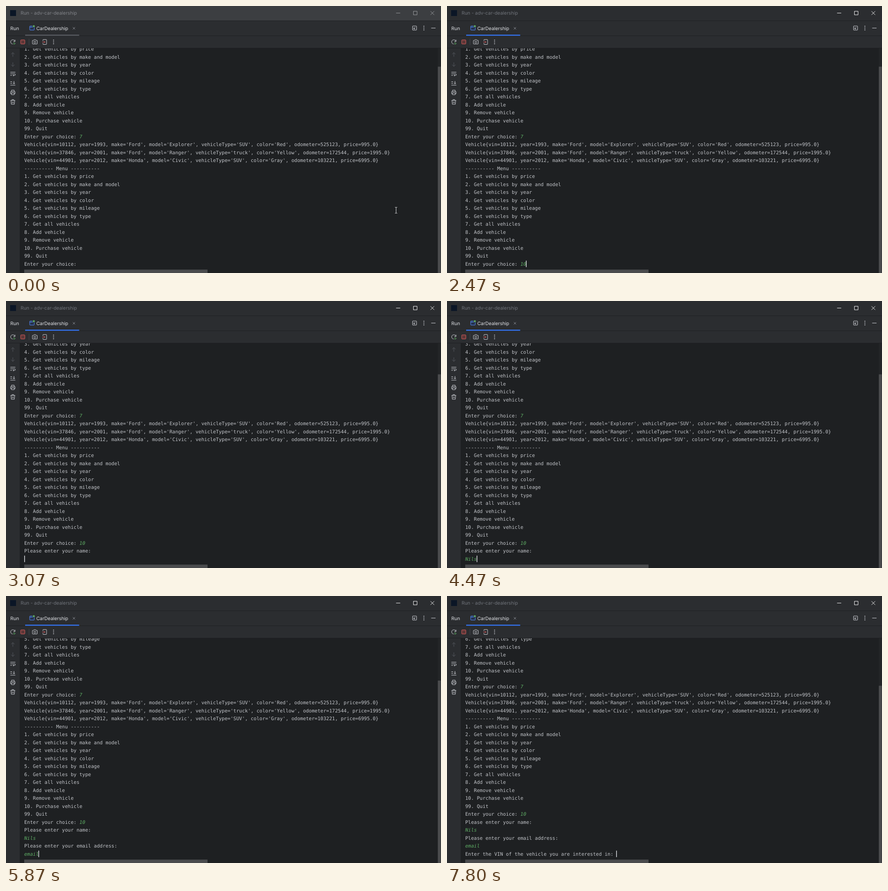
Recreate the animation shown at these times as an HTML page. Size 954 by 587 pixels, loop 8 s.

```html
<!DOCTYPE html>
<html lang="en">
<head>
<meta charset="utf-8">
<title>Run console</title>
<style>
  html, body { margin: 0; width: 100%; height: 100%; overflow: hidden; background: #1e2022; }
  svg { display: block; }
  text { white-space: pre; text-rendering: geometricPrecision; }
  .ui { font: 10.4px Inter, "Open Sans", sans-serif; }
  .mono { font: 10.585px "DejaVu Sans Mono", "Noto Sans Mono", monospace; fill: #c2c4c9; }
  .typed { font-style: italic; fill: #5fad65; }
  .icon { fill: none; stroke: #ced0d6; stroke-width: 1; }
  .dim { stroke: #55585e; }
  .dots { fill: #ced0d6; }
</style>
</head>
<body>
<svg width="954" height="587" viewBox="0 0 954 587">
  <defs>
    <clipPath id="pane"><rect x="31" y="93" width="916" height="487"/></clipPath>
  </defs>
  <rect width="954" height="587" fill="#1e2022"/>

  <!-- title bar -->
  <rect id="bar" width="954" height="32"/>
  <rect x="9" y="9" width="13" height="13" fill="#0b1626"/>
  <text id="title" class="ui" x="32" y="19.3">Run - adv-car-dealership</text>
  <path id="win" fill="none" d="M855.5 15.5h9M893.5 11.5h8v8h-8zM931 11.5l8 8M939 11.5l-8 8"/>

  <!-- tab row and toolbar -->
  <rect y="33" width="954" height="32" fill="#2b2d30"/>
  <rect y="66" width="954" height="27" fill="#2b2d30"/>
  <rect y="92" width="954" height="1" fill="#1e1f22"/>
  <rect y="93" width="30" height="494" fill="#2b2d30"/>
  <text class="ui" x="9.6" y="53" fill="#dfe1e5" font-weight="600">Run</text>
  <text class="ui" x="66.5" y="53" fill="#dfe1e5">CarDealership</text>
  <rect id="tab" x="42" y="63" width="118.5" height="2.4"/>
  <rect x="52" y="44" width="10" height="9" rx="1" fill="#25324d" stroke="#548af7"/>
  <path d="M52 46.5h10" stroke="#548af7"/>
  <circle cx="61" cy="44.4" r="2.9" fill="#2b2d30"/>
  <circle cx="61" cy="44.4" r="2.2" fill="#5fad65"/>
  <path class="icon" style="stroke:#868a91" d="M146.5 46.5l5 5M151.5 46.5l-5 5"/>
  <g class="icon">
    <rect x="891.5" y="44" width="9" height="9" rx="1"/>
    <path d="M898 46.5l-3.6 3.6M894.2 47.2v3.2h3.2M932.5 48.5h9.5"/>
    <!-- rerun -->
    <path d="M19.5 78.2a4.6 4.6 0 1 0-4.8 5.3M19.8 74.2v3.8h-3.8"/>
    <path d="M17 80.3l3.8 2.2l-3.8 2.2z" style="stroke:#57965c;fill:#253627"/>
    <rect x="32.3" y="74.5" width="9" height="9" rx="1" style="stroke:#db5c5c;fill:#5e3838"/>
    <path d="M50.5 72v14" style="stroke:#43454a"/>
    <!-- camera -->
    <path d="M58.5 75.5h2l1-1.5h3.4l1 1.5h2q.6 0 .6.6v6.8q0 .6-.6.6h-9.4q-.6 0-.6-.6v-6.8q0-.6.6-.6z"/>
    <circle cx="63.2" cy="79.3" r="2.1"/>
    <!-- exit -->
    <path d="M81 76.8v-2.3q0-.8.8-.8h6.4q.8 0 .8.8v9.2q0 .8-.8.8h-6.4q-.8 0-.8-.8v-2.3"/>
    <path d="M79.5 79.2h6M83.6 77.2l2 2l-2 2" style="stroke:#db5c5c"/>
    <!-- side strip -->
    <path class="dim" d="M15 111.5v-9M11.2 106.2l3.8-3.8l3.8 3.8M15 124v9M11.2 129l3.8 3.8l3.8-3.8"/>
    <path d="M9.5 145.5h11M9.5 149h9q2 0 2 1.8t-2 1.8h-3.2M17 150.8l-1.8 1.8l1.8 1.8M9.5 152.6h3.5"/>
    <path d="M9.5 166.5h4M9.5 170h4M9.5 174h11M17.5 165v6M15.2 169l2.3 2.3l2.3-2.3"/>
    <path d="M12 188.2v-3.2h6v3.2M12 193h-1.8v-4.8h9.6v4.8h-1.8M12 191h6v4h-6z"/>
    <path d="M9.8 207.7h10.4M13 207.5v-1.7h4v1.7M11 208l.6 8h6.8l.6-8M13.8 210.3v3.5M16.2 210.3v3.5"/>
  </g>
  <g id="dots" class="dots"></g>

  <!-- console -->
  <g clip-path="url(#pane)">
    <g id="log" class="mono"></g>
  </g>
  <rect id="caret" width="1.4" height="14.3" fill="#e4e6ea"/>
  <rect x="40" y="579.5" width="402" height="7.5" fill="#4a4b4d"/>
  <rect x="947" y="93" width="7" height="494" fill="#232527"/>
  <rect id="thumb" x="947" width="6.5" fill="#4a4b4d"/>
  <rect id="glow" x="949" y="135" width="3" height="450" fill="#5a5b5d"/>
  <path id="beam" fill="none" stroke="#d6d7d9" d="M-2.5 -6.5h2l.5 .5l.5 -.5h2M0 -6v12M-2.5 6.5h2l.5 -.5l.5 .5h2"/>
</svg>
<script>
const LOOP = 8000, LEFT = 40, COL = 6.37, ROW = 17.51, BASE = 571, LAST = 27;
const $ = id => document.getElementById(id);

function make(tag, parent, attrs) {
  const el = document.createElementNS("http://www.w3.org/2000/svg", tag);
  for (const key in attrs) el.setAttribute(key, attrs[key]);
  return parent.appendChild(el);
}
const put = (el, key, value) => el.setAttribute(key, value);
const show = (el, on) => put(el, "visibility", on ? "visible" : "hidden");

for (const [x, y] of [[916.5, 48.5], [104.3, 79]])
  for (const d of [-4, 0, 4]) make("circle", $("dots"), { cx: x, cy: y + d, r: 1.1 });

const menu = ["1. Get vehicles by price", "2. Get vehicles by make and model",
  "3. Get vehicles by year", "4. Get vehicles by color", "5. Get vehicles by mileage",
  "6. Get vehicles by type", "7. Get all vehicles", "8. Add vehicle", "9. Remove vehicle",
  "10. Purchase vehicle", "99. Quit", "Enter your choice: "];

const car = (vin, year, make, model, type, color, miles, price) =>
  `Vehicle{vin=${vin}, year=${year}, make='${make}', model='${model}', ` +
  `vehicleType='${type}', color='${color}', odometer=${miles}, price=${price}.0}`;

const lines = [...menu,
  car(10112, 1993, "Ford", "Explorer", "SUV", "Red", 525123, 995),
  car(37846, 2001, "Ford", "Ranger", "truck", "Yellow", 172544, 1995),
  car(44901, 2012, "Honda", "Civic", "SUV", "Gray", 103221, 6995),
  "---------- Menu ----------", ...menu,
  "Please enter your name:", "", "Please enter your email address:", "",
  "Enter the VIN of the vehicle you are interested in: "];

const rowY = row => BASE + (row - LAST) * ROW;
const addText = (row, col, text, cls = "") => {
  const el = make("text", $("log"), { x: LEFT + col * COL, y: rowY(row), class: cls });
  el.textContent = text;
  return el;
};

const printed = lines.map((text, row) => addText(row, 0, text));
addText(11, 19, "7", "typed");

// Keyboard input: row, text and the time of each key
const inputs = [
  { row: 27, text: "10", keys: [2470, 2470] },
  { row: 29, text: "Nils", keys: [3930, 4070, 4200, 4470] },
  { row: 31, text: "email", keys: [5400, 5490, 5580, 5670, 5870] },
  { row: 32, text: "3", keys: [7270], erase: 7800 }
];
for (const item of inputs) item.el = addText(item.row, lines[item.row].length, "", "typed");

// Times at which the console grows by one line
const feeds = [2870, 3070, 5000, 5000, 6270];
const countUntil = (times, t) => times.filter(at => at <= t).length;
const within = (t, a, b) => t >= a && t < b;

function draw(t) {
  const active = t >= 470;
  put($("bar"), "fill", active ? "#2b2d30" : "#3c3e41");
  put($("title"), "fill", active ? "#6f737a" : "#808388");
  put($("win"), "stroke", active ? "#f2f2f2" : "#97999c");
  put($("tab"), "fill", t >= 530 ? "#3574f0" : "#5a5d63");

  const fed = countUntil(feeds, t);
  put($("log"), "transform", `translate(0 ${-fed * ROW})`);
  const top = 93 + 494 * (1 - 490 / (533.6 + 17.5 * fed));
  put($("thumb"), "y", top);
  put($("thumb"), "height", 587 - top);
  show($("glow"), within(t, 1200, 1270));

  show(printed[28], t >= 3070);
  show(printed[30], t >= 5000);
  show(printed[32], t >= 6270);

  const end = LAST + fed;
  let row = end, col = end === 28 ? 0 : lines[end].length;
  for (const item of inputs) {
    const n = t >= item.erase ? 0 : countUntil(item.keys, t);
    item.el.textContent = item.text.slice(0, n);
    if (item.row === end) col += n;
  }
  if (t < 2470) { row = 20; col = lines[20].length; }
  // The caret always sits on a whole pixel
  put($("caret"), "x", Math.floor(LEFT + col * COL));
  put($("caret"), "y", rowY(row) - fed * ROW - 11.2);
  show($("caret"), active && !within(t, 1470, 2000) && !within(t, 7000, 7270));

  // Pointer leaves in three sampled steps
  const step = t < 800 ? 0 : Math.min(3, 1 + Math.floor((t - 800) / 66.7));
  put($("beam"), "transform", `translate(${855.5 + 18 * step} ${449 + 4 * step})`);
  show($("beam"), t < 1000);
}

function tick() {
  draw(performance.now() % LOOP);
  requestAnimationFrame(tick);
}
tick();
</script>
</body>
</html>
```
